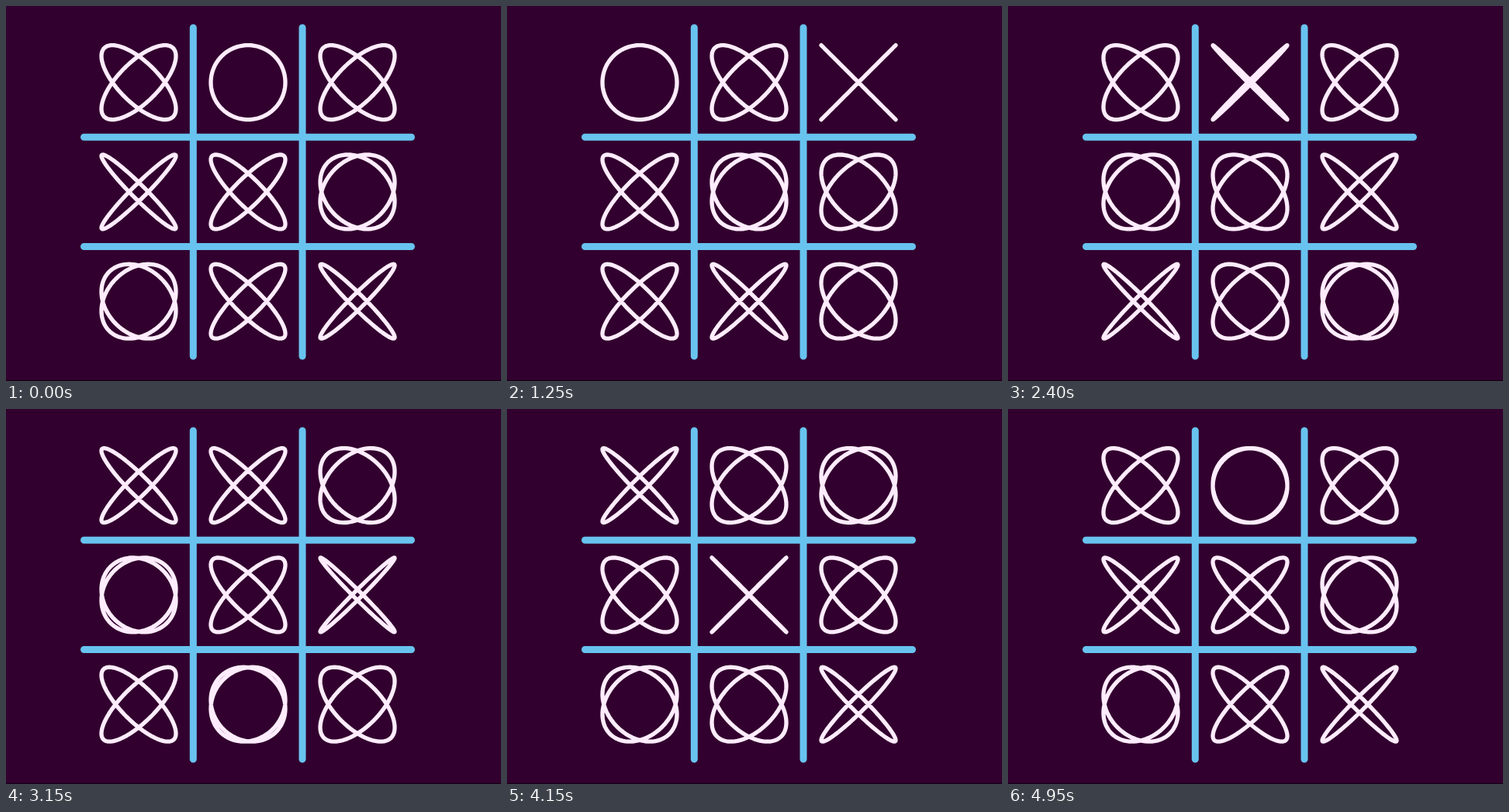
An HTML page for the animation above (5000 ms loop, 638 by 484 pixels).

```html
<!DOCTYPE html>
<html lang="en">
<head>
<meta charset="utf-8">
<title>Noughts and crosses</title>
<style>
  html, body { margin: 0; width: 100%; height: 100%; overflow: hidden; background: #32002e; }
  svg { display: block; width: 100%; height: 100%; }
  path { fill: none; stroke-linecap: round; stroke-linejoin: round; }
  .grid { stroke: #68c3ef; stroke-width: 9; }
  .mark { stroke: #feecfd; stroke-width: 5.3; }
</style>
</head>
<body>
<svg viewBox="0 0 638 484">
  <rect width="638" height="484" fill="#32002e"/>
  <rect y="483" width="638" height="1" fill="#100010"/>
  <g id="marks"></g>
  <path class="grid" d="M241.3 28V452M382 28V452M100.5 169.2H522.5M100.5 310.5H522.5"/>
</svg>
<script>
  const LOOP = 5000, STEP = 50, RADIUS = 48, POINTS = 96;
  const group = document.getElementById('marks');
  const cells = [];

  for (let row = 0; row < 3; row++) {
    for (let col = 0; col < 3; col++) {
      const path = document.createElementNS('http://www.w3.org/2000/svg', 'path');
      path.setAttribute('class', 'mark');
      group.appendChild(path);
      cells.push({
        path,
        x: 171 + 141 * col,
        y: 98.6 + 141.3 * row,
        phase: 45 + 45 * col - 60 * row
      });
    }
  }

  // Lissajous ellipse inside a square; flip = -1 mirrors it.
  function ellipse(cx, cy, delta, flip) {
    let d = '';
    for (let i = 0; i < POINTS; i++) {
      const a = i / POINTS * 2 * Math.PI;
      const x = cx + flip * RADIUS * Math.cos(a + delta / 2);
      const y = cy + RADIUS * Math.cos(a - delta / 2);
      d += (i ? 'L' : 'M') + x.toFixed(2) + ' ' + y.toFixed(2);
    }
    return d + 'Z';
  }

  function draw(ms) {
    const t = Math.floor((ms % LOOP) / STEP) * STEP / LOOP;
    for (const { path, x, y, phase } of cells) {
      const delta = (phase + 180 * t) * Math.PI / 180;
      path.setAttribute('d', ellipse(x, y, delta, 1) + ellipse(x, y, delta, -1));
    }
  }

  const start = performance.now();
  function tick() {
    draw(performance.now() - start);
    requestAnimationFrame(tick);
  }
  tick();
</script>
</body>
</html>
```
